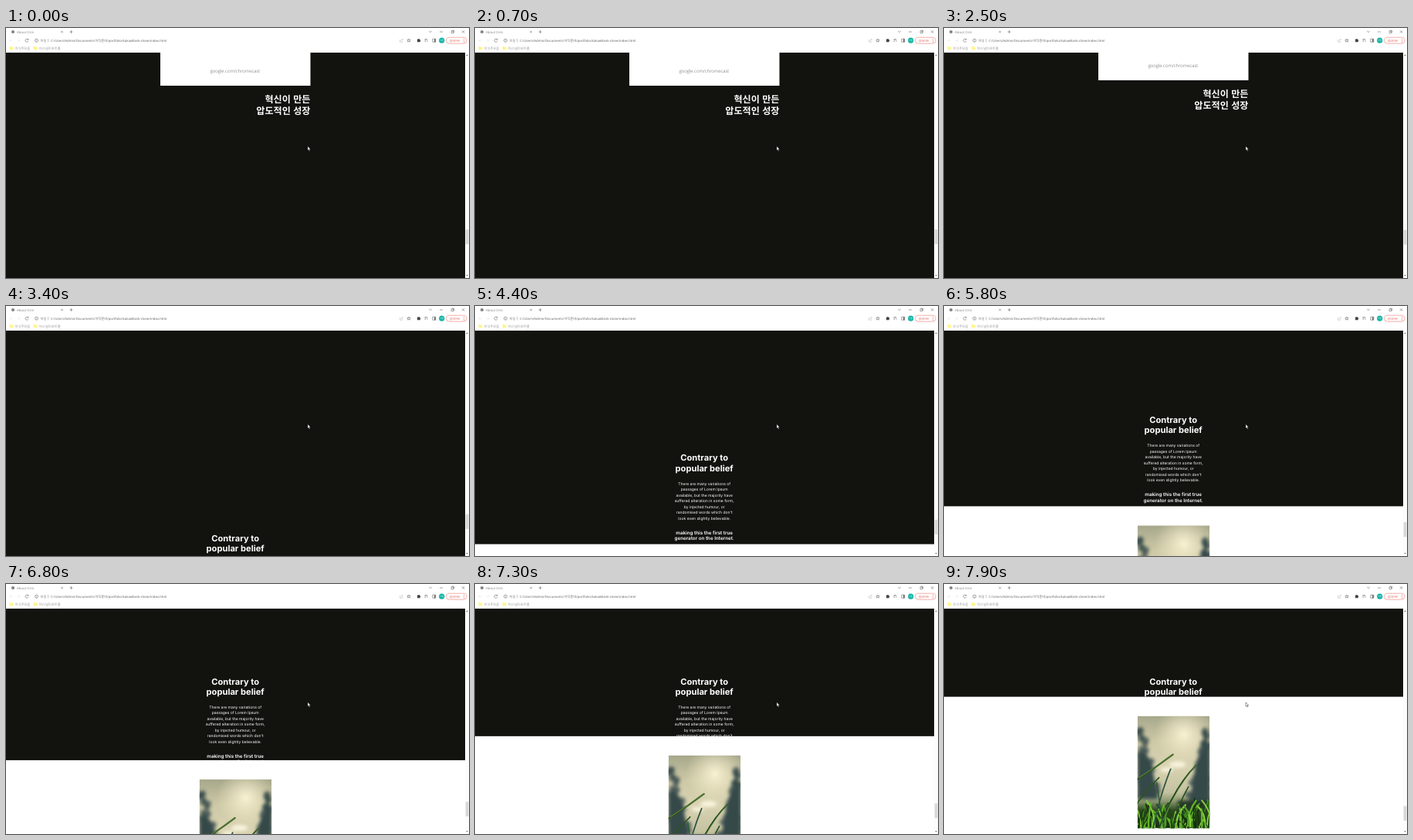
Write an HTML page that moves like this. It is 600 px wide and 325 px high and loops after 8000 ms.

```html
<!DOCTYPE html>
<html lang="ko">
<head>
<meta charset="utf-8">
<title>Page scroll</title>
<style>
html, body { margin: 0; width: 100%; height: 100%; overflow: hidden; background: #fff; }
svg { display: block; width: 100vw; height: 100vh; text-rendering: geometricPrecision; }
.ui { font-family: "Noto Sans", "Noto Sans CJK KR", "Noto Sans CJK", sans-serif; font-size: 4.3px; fill: #777; }
.icon { fill: none; stroke: #666; stroke-width: .6; }
.ko { font: 700 12.1px "Noto Sans CJK KR", "Noto Sans CJK", sans-serif; fill: #fff; text-anchor: end; }
.copy { font-family: Inter, sans-serif; fill: #fff; text-anchor: middle; }
</style>
</head>
<body>
<svg viewBox="0 0 600 325" preserveAspectRatio="none">
  <defs>
    <clipPath id="view"><rect y="32" width="595" height="293"/></clipPath>
    <clipPath id="frame"><rect width="93.5" height="146"/></clipPath>
    <linearGradient id="sky" x2="0" y2="1">
      <stop offset="0" stop-color="#a6a78b"/><stop offset=".22" stop-color="#cdc8a6"/>
      <stop offset=".45" stop-color="#d9d3b2"/><stop offset=".68" stop-color="#c3c2a0"/>
      <stop offset=".76" stop-color="#8b966f"/><stop offset=".84" stop-color="#2c4a20"/>
      <stop offset="1" stop-color="#163010"/>
    </linearGradient>
    <radialGradient id="sun">
      <stop offset="0" stop-color="#f8f1d2"/><stop offset="1" stop-color="#f0e8c4" stop-opacity="0"/>
    </radialGradient>
    <filter id="soft" x="-50%" y="-50%" width="200%" height="200%"><feGaussianBlur stdDeviation="1.9"/></filter>
  </defs>

  <g clip-path="url(#view)">
    <rect y="32" width="595" height="293" fill="#12120f"/>
    <g id="top">
      <rect x="200" y="-80" width="194.5" height="155" fill="#fff"/>
      <text x="297" y="58.3" text-anchor="middle" font-family="Open Sans, sans-serif" font-weight="300" font-size="6" fill="#555">google.com/chromecast</text>
      <text class="ko" x="394.5" y="96.6">혁신이 만든</text>
      <text class="ko" x="394.5" y="112.3">압도적인 성장</text>
    </g>
    <g id="copy" class="copy"></g>
    <g id="next">
      <rect width="595" height="400" fill="#fff"/>
      <g id="photo" transform="translate(250.7 25)" clip-path="url(#frame)">
        <rect width="93.5" height="146" fill="url(#sky)"/>
        <circle cx="60" cy="24" r="38" fill="url(#sun)"/>
        <g id="trees" filter="url(#soft)" fill="#35484a"></g>
        <g fill="#fffbe6" opacity=".8" filter="url(#soft)">
          <ellipse cx="52" cy="63" rx="11" ry="4"/><ellipse cx="38" cy="70" rx="8" ry="3"/>
        </g>
        <g id="grass" fill="none" stroke-linecap="round"></g>
      </g>
    </g>
  </g>

  <rect x="595" y="32" width="5" height="293" fill="#fcfcfc"/>
  <path d="M596.2 36l1.3-1.6 1.3 1.6zM596.2 321l1.3 1.6 1.3-1.6z" fill="#666"/>
  <rect id="thumb" x="595.6" y="262" width="3.8" height="19" fill="#d8d8d8"/>

  <rect width="600" height="32" fill="#fff"/>
  <g class="ui">
    <circle cx="9" cy="5" r="2" fill="#666"/>
    <path d="M7.4 4.6l1.5.5.2 1.5M9.2 3.4l1.4.8" stroke="#fff" stroke-width=".5" fill="none"/>
    <text x="14" y="6.5" fill="#888">About Orin</text>
    <text x="58" y="17.8" font-size="4.25" fill="#666">C:/Users/Admin/Documents/이직준비/portfolio/kakaoBank-clone/index.html</text>
    <text x="44.5" y="17.8" fill="#888">파일</text>
    <text x="11.5" y="27.5" fill="#999">의식주모음</text>
    <text x="43" y="27.5" fill="#999">퍼스널리포트폴</text>
    <path d="M4.5 24h2l.7.7h2.3v3.5h-5zM35.7 24h2l.7.7h2.3v3.5h-5z" fill="#fdf58e"/>
    <g class="icon">
      <path d="M71.3 3.8l2.4 2.4m0-2.4l-2.4 2.4M82.5 5h4M84.5 3v4M548.2 4l1.8 1.6 1.8-1.6M562 5h4M591 3.3l3.2 3.2m0-3.2L591 6.5"/>
      <path d="M577 4h2.7v2.7H577zM578 4v-.8h2.6v2.6h-.8"/>
      <path d="M8.5 16.2H4.8m1.6-1.6l-1.6 1.6 1.6 1.6M14.5 16.2h3.6m-1.5-1.6l1.5 1.6-1.5 1.6" stroke="#e4e4e4"/>
      <path d="M28.7 15a2 2 0 1 0 .2 2M29 13.8v1.5h-1.5"/>
      <circle cx="39.5" cy="16.2" r="2"/><path d="M39.5 15v.4m0 .5v1.5M54.5 14v4.4" stroke="#888" stroke-width=".5"/>
      <path d="M510.6 15v3.2h3.3v-1.3m-2 0c0-1.5 1-2 2.5-2m-1-1l1 1-1 1" stroke="#bbb"/>
      <path d="M522 14l.6 1.4 1.6.1-1.2 1 .4 1.6-1.4-.8-1.4.8.4-1.6-1.2-1 1.6-.1z"/>
      <path d="M542.5 14.5h3.6m-3.6 1.4h2.4m-2.4 1.4h1.5M546 15.5v2.2"/>
      <path d="M552.8 14.2h4v4h-4z"/><path d="M555.8 14.2v4" stroke-width="1.6"/>
    </g>
    <path d="M533 14.6h1.2a.7.7 0 0 1 1.4 0h1v1.2a.7.7 0 0 1 0 1.4v1.1H533z" fill="#444"/>
    <circle cx="564.7" cy="16.2" r="3.6" fill="#12b5a6"/>
    <text x="564.7" y="17.2" text-anchor="middle" font-size="2.8" fill="#fff">서진</text>
    <rect x="570.5" y="12.2" width="26.5" height="8" rx="4" fill="#fff" stroke="#f08d86" stroke-width=".7"/>
    <text x="574.8" y="17.6" font-size="3.7" fill="#e0554a">업데이트</text>
    <path d="M593.5 14.2v4.4" stroke="#d93025" stroke-width=".8" stroke-dasharray=".8 1"/>
  </g>
  <path d="M391 153.8v5.2l1.2-1 .9 1.9.9-.4-.9-1.9h1.6z" fill="#fff" stroke="#222" stroke-width=".45"/>
</svg>
<script>
const $ = id => document.getElementById(id);
const LOOP = 8000, STEP = 100, NOTCH = 31.25;

function lines(rows, y, pitch, size, weight) {
  return rows.map((row, i) =>
    `<text x="297.2" y="${y + i * pitch}" font-size="${size}" font-weight="${weight}">${row}</text>`).join("");
}
// Baselines are measured from the cap line of the heading.
$("copy").innerHTML =
  lines(["Contrary to", "popular belief"], 9.4, 13.5, 11.15, 700) +
  lines(["There are many variations of", "passages of Lorem Ipsum", "available, but the majority have",
    "suffered alteration in some form,", "by injected humour, or",
    "randomised words which don't", "look even slightly believable."], 40.8, 7.5, 5, 400) +
  lines(["making this the first true", "generator on the Internet."], 104.8, 7.5, 6.25, 600);

let seed = 11;
const rnd = (a, b) => {
  seed = (seed * 16807) % 2147483647;
  return a + (b - a) * seed / 2147483647;
};

// Leafy crowns on both sides, widening downwards.
let trees = '<path d="M0 50Q14 40 20 72T26 108H0zM94 40Q78 42 74 72T66 112H94z"/>';
for (let i = 0; i < 70; i++) {
  const y = rnd(18, 104), reach = 8 + (y - 18) * .24, off = reach * rnd(.1, 1);
  const x = i % 2 ? 94 - off : off;
  trees += `<circle cx="${x}" cy="${y}" r="${rnd(2, 5)}" opacity=".8"/>`;
}
$("trees").innerHTML = trees + '<path d="M52 110h42v14H52z" fill="#26382c"/>';

const blade = (x, y, cx, cy, tx, ty, color, w) =>
  `<path d="M${x} ${y}Q${cx} ${cy} ${tx} ${ty}" stroke="${color}" stroke-width="${w}"/>`;
const greens = ["#1f4512", "#3f8a1c", "#62b526", "#142f0c", "#86cf3e"];
let grass = "";
for (let i = 0; i < 80; i++) {
  const x = rnd(-4, 98), h = rnd(8, 38), lean = rnd(-13, 13), y = rnd(140, 154);
  grass += blade(x, y, x, y - h * .6, x + lean, y - h, greens[i % 5], rnd(1, 2.4));
}
grass += blade(-3, 84, 22, 68, 46, 50, "#2c531e", 2) + blade(2, 80, 24, 66, 46, 50, "#7fa643", .7) +
  blade(20, 148, 28, 106, 43, 69, "#2d5340", 1.7) + blade(28, 146, 48, 92, 76, 64, "#24481f", 2) +
  blade(32, 138, 52, 90, 76, 64, "#78a84c", .6) + blade(-2, 116, 10, 98, 28, 80, "#2c531e", 1.6) +
  blade(34, 146, 29, 115, 25, 87, "#315a36", 1.5) + blade(46, 146, 51, 118, 66, 92, "#274c1f", 1.6);
$("grass").innerHTML = grass;

// Continuous wheel spin, then single notches.
const spin = [[2400, 0], [2500, 7], [2800, 84], [2900, 93.75], [3100, 93.75], [3200, 99], [3300, 119],
  [3400, 132.5], [4000, 218.75], [4200, 226], [4300, 230.5], [4400, 237], [4500, 250]];
const notches = [4900, 5800, 6800, 7300, 7800];
const ease = [.16, .8, .96, 1];

function scrollAt(t) {
  let s = 0;
  for (let i = 1; i < spin.length; i++) {
    const [t0, s0] = spin[i - 1], [t1, s1] = spin[i];
    s += (s1 - s0) * Math.min(1, Math.max(0, (t - t0) / (t1 - t0)));
  }
  for (const start of notches)
    if (t >= start) s += NOTCH * ease[Math.min(3, (t - start) / STEP)];
  return s;
}

const shift = (id, y) => $(id).setAttribute("transform", `translate(0 ${y.toFixed(2)})`);

function draw(ms) {
  const s = scrollAt(Math.floor(ms % LOOP / STEP) * STEP);
  shift("top", -s);
  shift("copy", Math.max(121.2, 428.75 - s)); // sticky
  shift("next", 546.6 - s);
  shift("thumb", s * .0667);
}

const begin = performance.now();
function tick() {
  draw(performance.now() - begin);
  requestAnimationFrame(tick);
}
draw(0);
requestAnimationFrame(tick);
</script>
</body>
</html>
```
